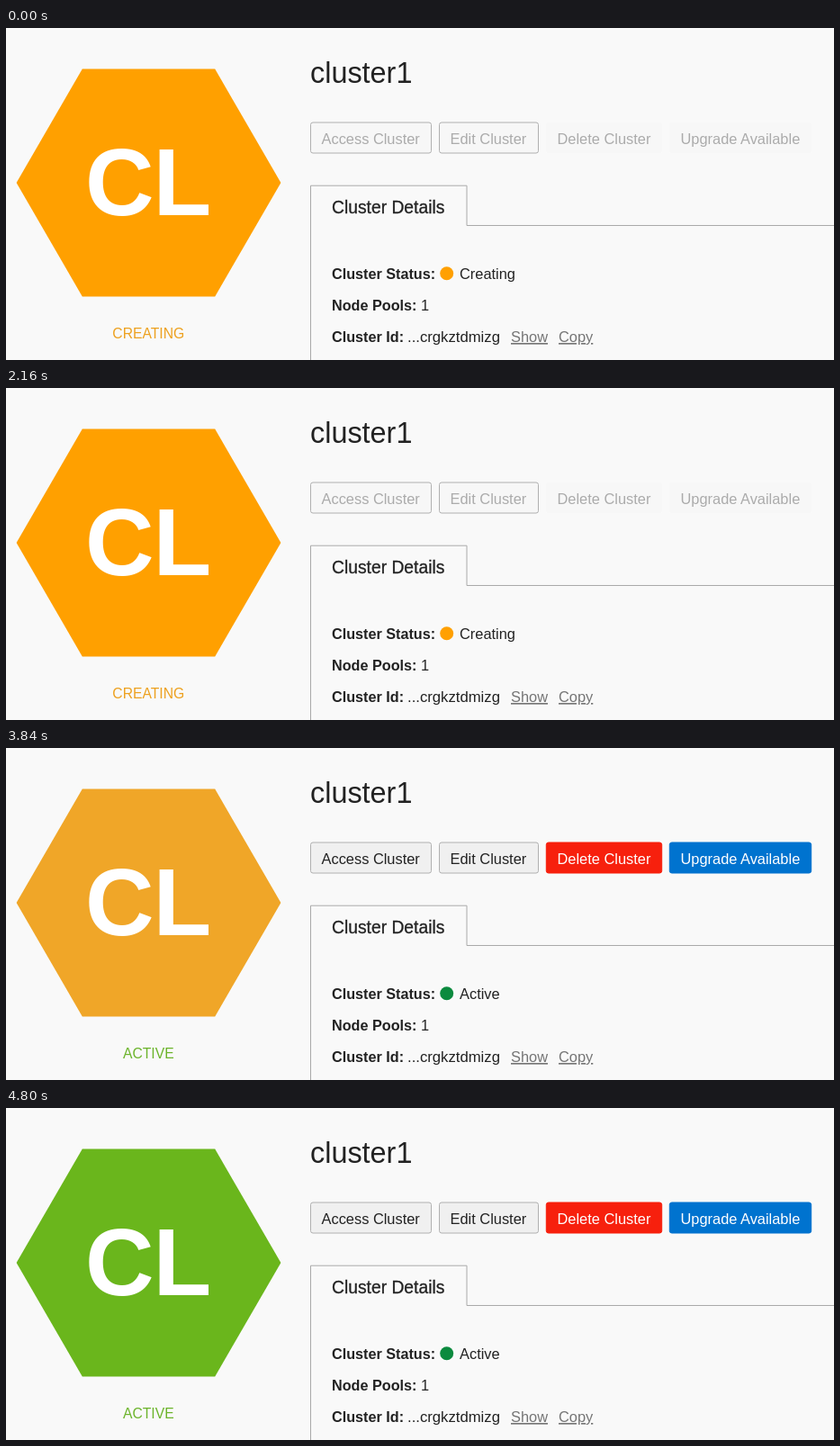
Write an HTML page that moves like this. It is 920 px wide and 369 px high and loops after 4.86 s.

```html
<!DOCTYPE html>
<html lang="en">
<head>
<meta charset="utf-8">
<title>Cluster status</title>
<style>
  html, body { margin: 0; width: 100%; height: 100%; overflow: hidden; background: #f9f9f9; }
  svg { display: block; width: 920px; height: 369px; font: 16.4px "Liberation Sans", Arial, sans-serif; fill: #222; }
  .label { font-weight: bold; font-size: 16.2px; }
  .link { fill: #757575; text-decoration: underline; }
  .button rect { fill: #f0f0f0; stroke: #b0b0b0; }
  .button.danger rect { fill: #f7200d; stroke: #f7200d; }
  .button.primary rect { fill: #0073cf; stroke: #0073cf; }
  .danger text, .primary text { fill: #fff; }
  .creating .button rect { fill: #f7f7f7; }
  .creating .button text { fill: #ababab; }
  .creating .danger rect, .creating .primary rect { stroke: none; }
  #dot { fill: #0b8a3e; }
  .creating #dot { fill: #ffa000; }
  #caption { fill: #6cb42c; font-size: 15.7px; text-anchor: middle; }
  .creating #caption { fill: #eda11f; }
</style>
</head>
<body>
<svg id="stage" class="creating" viewBox="0 0 920 369">
  <path id="hexagon" d="M11.6 172 84.8 45.5H232.2L305.4 172 232.2 298.4H84.8Z"/>
  <text x="88" y="208" font-size="106" font-weight="bold" letter-spacing="-1" fill="#fff">CL</text>
  <text id="caption" x="158.3" y="345">CREATING</text>

  <text x="338" y="61" font-size="32.4">cluster1</text>
  <g class="button"><rect x="338.5" y="105" width="134" height="34" rx="2.5"/><text x="350.5" y="129">Access Cluster</text></g>
  <g class="button"><rect x="481.5" y="105" width="110" height="34" rx="2.5"/><text x="493.5" y="129">Edit Cluster</text></g>
  <g class="button danger"><rect x="600.3" y="105" width="128.4" height="34" rx="2.5"/><text x="612.5" y="129">Delete Cluster</text></g>
  <g class="button primary"><rect x="737.3" y="105" width="157.4" height="34" rx="2.5"/><text x="749.5" y="129">Upgrade Available</text></g>

  <path d="M338.5 370V175.2H512V219.5H920" fill="none" stroke="#aaa"/>
  <text x="362" y="205.5" font-size="19.3" stroke="#222" stroke-width=".3">Cluster Details</text>

  <text class="label" x="362" y="279">Cluster Status:</text>
  <circle id="dot" cx="489.7" cy="272.8" r="7.5"/>
  <text id="status" x="504" y="279">Creating</text>
  <text class="label" x="362" y="314">Node Pools:</text>
  <text x="461" y="314">1</text>
  <text class="label" x="362" y="349">Cluster Id:</text>
  <text x="446" y="349" font-size="16.7">...crgkztdmizg</text>
  <text class="link" x="561" y="349">Show</text>
  <text class="link" x="614" y="349">Copy</text>
</svg>
<script>
const LOOP = 4860, STEP = 60, ACTIVE_AT = 3840, FADE_TIME = 300;
const ORANGE = [255, 160, 0], AMBER = [240, 166, 40], GREEN = [106, 182, 28];
const byId = id => document.getElementById(id);

// CSS "ease": cubic-bezier(.25, .1, .25, 1)
function ease(x) {
  if (x <= 0 || x >= 1) return Math.min(1, Math.max(0, x));
  const bezier = (a, b, u) => 3 * a * u * (1 - u) ** 2 + 3 * b * u * u * (1 - u) + u ** 3;
  let low = 0, high = 1;
  for (let i = 0; i < 20; i++) {
    const mid = (low + high) / 2;
    if (bezier(.25, .25, mid) < x) low = mid; else high = mid;
  }
  return bezier(.1, 1, low);
}

function draw(now) {
  const time = Math.floor(now % LOOP / STEP) * STEP;
  const creating = time < ACTIVE_AT;
  const status = creating ? "Creating" : "Active";
  const mix = ease((time - ACTIVE_AT) / FADE_TIME);
  const color = creating ? ORANGE : AMBER.map((c, i) => Math.round(c + (GREEN[i] - c) * mix));
  byId("stage").classList.toggle("creating", creating);
  byId("status").textContent = status;
  byId("caption").textContent = status.toUpperCase();
  byId("hexagon").setAttribute("fill", `rgb(${color})`);
}

const start = performance.now();
function tick() {
  draw(performance.now() - start);
  requestAnimationFrame(tick);
}
tick();
</script>
</body>
</html>
```
